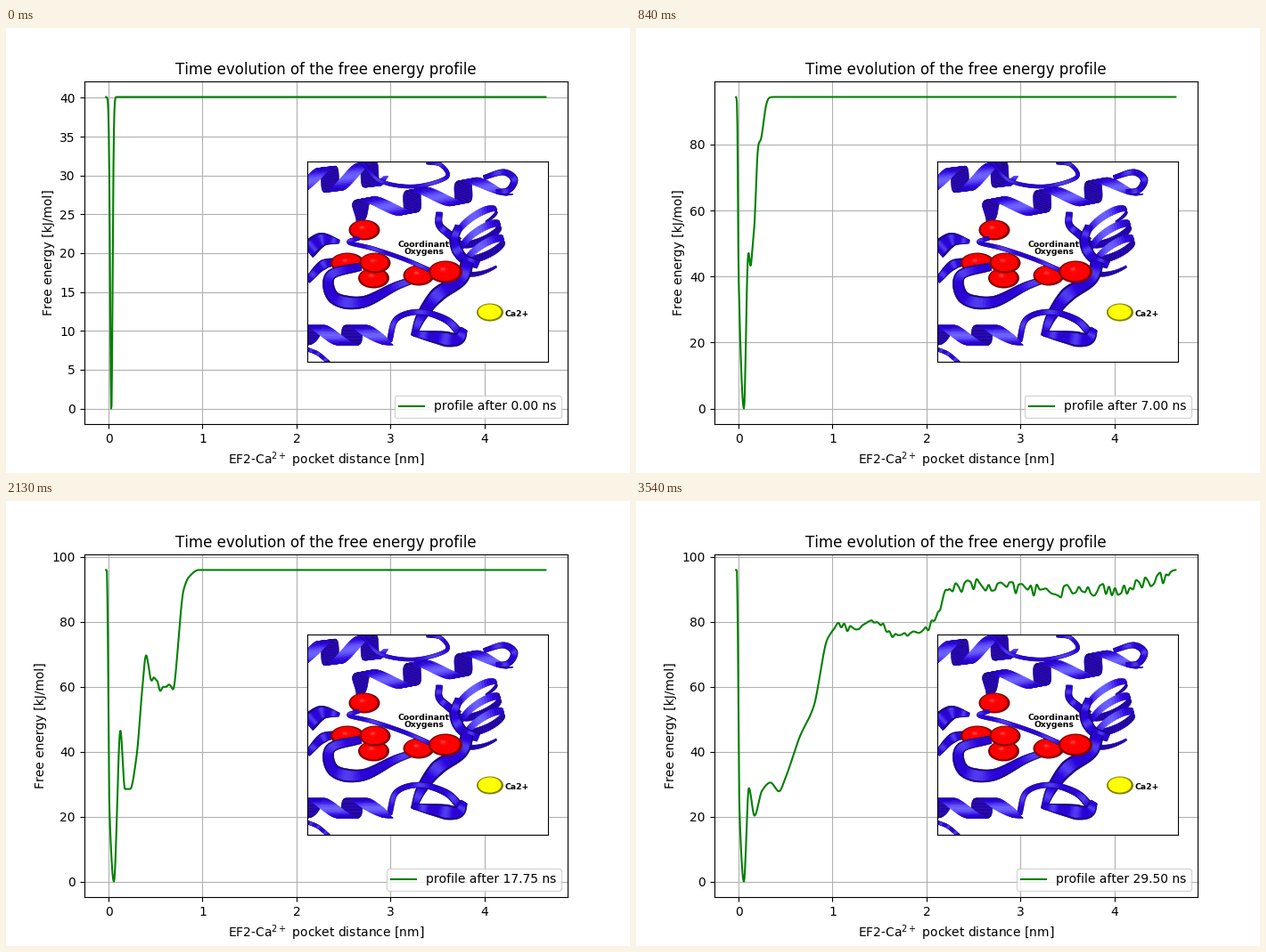
These frames come from a looping animation (700 by 500 pixels, 3570 ms). A matplotlib script:

```python
import numpy as np
import matplotlib.pyplot as plt
from matplotlib.animation import FuncAnimation
from matplotlib.collections import PolyCollection
from matplotlib.patches import Ellipse

plt.rcParams["font.family"] = "DejaVu Sans"
plt.rcParams["text.kerning_factor"] = 6

FRAMES, INTERVAL, NS_PER_FRAME = 119, 30, 0.25
TOP = 96
X = np.linspace(-0.027, 4.65, 940)
rng = np.random.default_rng(4)


# ---------- free energy profiles ----------

def hermite(points):
    """Monotone cubic through the points, sampled on X."""
    px, py = np.array(points, float).T
    h = np.diff(px)
    s = np.diff(py) / h
    m = np.zeros_like(py)
    keep = s[1:] * s[:-1] > 0
    m[1:-1][keep] = 2 * (s[1:] * s[:-1])[keep] / (s[1:] + s[:-1])[keep]
    i = np.clip(np.searchsorted(px, X) - 1, 0, len(h) - 1)
    t = np.clip((X - px[i]) / h[i], 0, 1)
    return ((2 * t**3 - 3 * t**2 + 1) * py[i] + (t**3 - 2 * t**2 + t) * h[i] * m[i]
            + (3 * t**2 - 2 * t**3) * py[i + 1] + (t**3 - t**2) * h[i] * m[i + 1])


def ripple(lo, hi, amp):
    """Smooth seeded noise between lo and hi."""
    nodes = np.arange(X[0], X[-1] + 0.06, 0.032)
    noise = hermite(np.column_stack([nodes, rng.uniform(-1, 1, len(nodes))]))
    return amp * noise * np.clip((X - lo) / 0.05, 0, 1) * np.clip((hi - X) / 0.05, 0, 1)


def hill(centre, height, left, right=None):
    width = np.where(X < centre, left, right or left)
    return height * np.exp(-0.5 * ((X - centre) / width) ** 2)


def scaled(v, top):
    return v * top / v.max()


def bias(points, noise=0):
    """Energy filled in so far: depth of the profile below its plateau."""
    profile = hermite(WALL + points + [(X[-1], TOP)]) + noise
    return scaled(np.maximum(TOP - profile, 0), TOP)


WALL = [(-0.018, TOP), (-0.008, 78), (0.01, 22), (0.057, 0)]
BARRIER = [(0.126, 46.5), (0.175, 28.5), (0.23, 28.5)]

edge = 0.5 + 0.5 * np.tanh((X + 0.008) / 0.006)
outer = hill(0.128, 44, 0.022) + hill(0.17, 28, 0.02) + hill(0.23, 13, 0.035)

first = scaled(hill(0.03, 40.1, 0.013), 40.1)
early = scaled(edge * (hill(0.03, 57.4, 0.014) + outer), 57.4)
pocket = scaled(edge * (hill(0.057, 94, 0.055, 0.028) + outer), 94.4)
second = bias(BARRIER + [(0.3, 44), (0.385, 74), (0.45, 77), (0.53, 91), (0.61, 94.3),
                         (0.71, 91), (0.8, 95.6), (0.95, TOP)])
shelf = bias(BARRIER + [(0.3, 39), (0.355, 58), (0.4, 69.7), (0.45, 62.5), (0.54, 60),
                        (0.68, 59), (0.8, 90), (0.86, 94), (0.96, TOP)],
             ripple(0.42, 0.72, 1.8))
opening = bias([(0.118, 32.7), (0.18, 25.5), (0.24, 26.5), (0.355, 47.7), (0.435, 30.5),
                (0.49, 34.5), (0.56, 47.5), (0.6, 45), (0.69, 51), (0.87, 71), (0.94, 83),
                (1, 85), (1.1, 95), (1.35, 95.5), (1.85, 91), (2.02, 89.7), (2.15, 90),
                (2.24, TOP)], ripple(1.05, 2.2, 1.6))
unbound = bias([(0.11, 28.8), (0.17, 20.3), (0.25, 28), (0.34, 30.5), (0.43, 27.8),
                (0.5, 32), (0.65, 44.5), (0.8, 54), (0.95, 75), (1.08, 79), (1.2, 77.8),
                (1.45, 80.6), (1.66, 76), (1.9, 76.3), (2.1, 81), (2.22, 90.4),
                (2.65, 91.3), (3.4, 89.5), (4, 89.8), (4.5, 93.5)],
               ripple(1, 2.2, 1) + ripple(2.2, 4.6, 2))

# frame, filled-in energy, then reach and lag of the front on the way to the next stage
STAGES = [(0, first, 0.35, 0.2), (13, early, 1, 0), (28, pocket, 0.9, 0.6),
          (50, second, 1, 0), (71, shelf, 2.2, 0.6), (90, opening, 4.6, 0.45),
          (118, unbound, 1, 0)]


def profile(k):
    n = max(i for i, stage in enumerate(STAGES[:-1]) if stage[0] <= k)
    (k0, v0, reach, lag), (k1, v1, *_) = STAGES[n:n + 2]
    delay = lag * np.clip(X / reach, 0, 1)
    w = np.clip(((k - k0) / (k1 - k0) - delay) / (1 - lag), 0, 1)
    v = (1 - w) * v0 + w * v1
    return v.max() - v


# ---------- main plot ----------

fig, ax = plt.subplots(figsize=(7, 5), dpi=100)
line, = ax.plot(X, profile(0), color="green", label="profile after 0.00 ns")
ax.set_title("Time evolution of the free energy profile")
ax.set_xlabel("EF2-Ca$^{2+}$ pocket distance [nm]")
ax.set_ylabel("Free energy [kJ/mol]")
ax.grid(True)
label = ax.legend(loc="lower right").get_texts()[0]

# ---------- protein picture, in stage pixels ----------

pic = fig.add_axes([338 / 700, 125 / 500, 270 / 700, 225 / 500])
pic.set(xlim=(338, 608), ylim=(375, 150), xticks=[], yticks=[])


def blue(shade):
    stops = [0, 0.6, 1]
    return np.column_stack([np.interp(shade, stops, channel) / 255 for channel in
                            ([18, 44, 105], [0, 4, 95], [90, 225, 255])])


def strip(mid, half, shade):
    """Quads along a band with edges mid - half and mid + half."""
    a, b = mid - half, mid + half
    quads = np.stack([a[:-1], a[1:], b[1:], b[:-1]], axis=1)
    colors = blue(shade[:-1])
    pic.add_collection(PolyCollection(quads, facecolors=colors, edgecolors=colors,
                                      linewidths=0.4), autolim=False)


def helix(start, end, radius, turns, width, lean=0.6, tilt=0.0, phase=0.0):
    """Ribbon wound round an axis; far half first, then the lit near half."""
    start, end = np.array(start, float), np.array(end, float)
    axis = (end - start) / np.hypot(*(end - start))
    across = np.array([-axis[1], axis[0]])
    t = np.linspace(0, 1, int(turns * 48))[:, None]
    phi = 2 * np.pi * turns * t + phase
    mid = (start + (end - start) * t + radius * np.cos(phi) * (across + lean * axis)
           + radius * tilt * np.sin(phi) * axis)
    half = axis * width / 2 * np.minimum(1, 0.3 + 6 * np.minimum(t, 1 - t))
    depth = (-np.sign(lean) * np.sin(phi))[:, 0]
    for near in (False, True):
        shade = 0.45 + 0.55 * depth**4 if near else 0.2 - 0.15 * depth
        runs = np.flatnonzero(np.diff((depth > 0).astype(int))) + 1
        for part in np.split(np.arange(len(t)), runs):
            if (depth[part].mean() > 0) == near:
                part = np.append(part, min(part[-1] + 1, len(t) - 1))
                strip(mid[part], half[part], shade[part])


def strand(points, w0, w1=None, w2=None):
    """Smooth tube through the points, its width going w0, w1, w2."""
    p = np.array(points, float)
    p = np.vstack([2 * p[0] - p[1], p, 2 * p[-1] - p[-2]])
    t = np.linspace(0, 1, 14, endpoint=False)[:, None]
    xy = np.vstack([b + t * (c - a) / 2 + t**2 * (a - 2.5 * b + 2 * c - d / 2)
                    + t**3 * (1.5 * (b - c) + (d - a) / 2)
                    for a, b, c, d in zip(p, p[1:], p[2:], p[3:])] + [p[-2:-1]])
    u = np.linspace(0, 1, len(xy))
    d = np.gradient(xy, axis=0)
    normal = np.column_stack([d[:, 1], -d[:, 0]]) / np.hypot(*d.T)[:, None]
    half = normal * np.interp(u, [0, 0.5, 1], [w0, w1 or w0, w2 or w0])[:, None] / 2
    glow = 0.55 + 0.3 * np.sin(3 * np.pi * u) ** 4
    strip(xy, half, 0.15 + 0 * u)
    strip(xy, half * 0.72, glow)


def ball(x, y, rx, ry, rgb):
    for q in np.linspace(0, 1, 7):
        size = 1 - 0.85 * q
        color = np.clip(np.array(rgb) * min(0.5 + 3 * q, 1) + max(q - 0.8, 0), 0, 1)
        pic.add_patch(Ellipse((x - rx * 0.15 * q, y - ry * 0.25 * q), 2 * rx * size,
                              2 * ry * size, fc=color, lw=0))


RED, YELLOW = (1, 0, 0), (1, 1, 0)

# upper helices and the loop between them
helix((330, 174), (428, 162), 14, 2.2, 20, lean=-0.6)
strand([(400, 152), (420, 172), (458, 178), (494, 168), (488, 154), (472, 151)], 4)
helix((384, 208), (556, 176), 13, 3, 20)
strand([(536, 168), (558, 162), (570, 170), (564, 182), (550, 184)], 5, 8, 5)

# right helix and the strand leading down from it
strand([(486, 207), (486, 221), (496, 231), (508, 240)], 7, 8, 9)
helix((526, 214), (538, 264), 26, 3, 8, lean=0.25, tilt=0.4, phase=2)
strand([(508, 222), (503, 240), (512, 258), (530, 266)], 8, 12, 9)
strand([(518, 262), (510, 282), (484, 300), (466, 324), (457, 346)], 14, 17, 6)
strand([(430, 352), (438, 327), (464, 319), (494, 328), (512, 346)], 6, 6, 9)
strand([(514, 338), (506, 350), (480, 347), (457, 343)], 8, 17, 6)

# lower left helix
helix((328, 345), (424, 345), 11, 2, 24)
strand([(338, 361), (350, 366), (362, 376)], 4)

# strands around the coordinating atoms
strand([(338, 250), (354, 238), (374, 240)], 20, 16, 4)
strand([(338, 284), (356, 266), (378, 262)], 7, 11, 6)
ball(383, 264, 19, 11.5, RED)
strand([(398, 268), (364, 278), (368, 303), (400, 308), (440, 289), (478, 277)], 9, 15, 5)
for x, y in [(402, 227), (412.5, 281), (414, 264), (463, 278)]:
    ball(x, y, 17.5, 11.5, RED)
strand([(396, 236), (385, 241), (412, 248), (450, 261), (486, 277)], 4.5)
ball(493, 274, 19, 12.5, RED)
ball(543, 319.5, 15, 10, YELLOW)

tag = dict(fontsize=6.7, weight="bold", ha="center", va="center")
pic.text(468.5, 243.5, "Coordinant", **tag)
pic.text(468.5, 252, "Oxygens", **tag)
pic.text(573.5, 322, "Ca2+", **tag)


def update(k):
    f = profile(k)
    line.set_ydata(f)
    ax.set_ylim(-0.05 * f.max(), 1.05 * f.max())
    label.set_text(f"profile after {k * NS_PER_FRAME:.2f} ns")
    return line, label


anim = FuncAnimation(fig, update, frames=FRAMES, interval=INTERVAL,
                     repeat=True, repeat_delay=0, blit=False)
plt.show()
```
